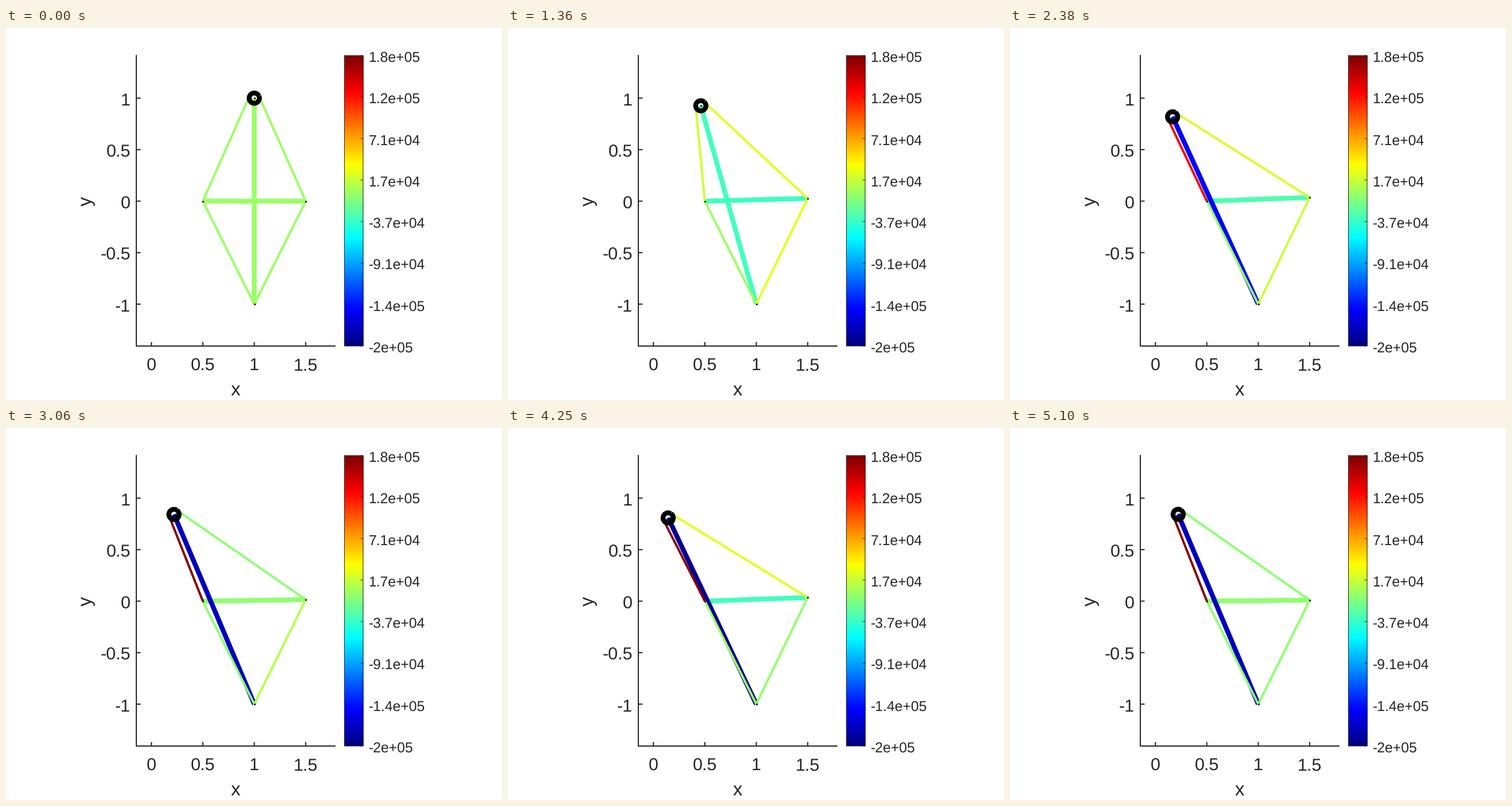
These frames come from a looping animation (864x648 px, 5270 ms). A matplotlib script:

```python
import numpy as np
import matplotlib.pyplot as plt
from matplotlib.animation import FuncAnimation

W, H, DPI = 864, 648, 100
PT = 72 / DPI
INK = "#262626"
plt.rcParams["font.family"] = "Liberation Sans"
plt.rcParams["text.hinting"] = "none"

fig = plt.figure(figsize=(W / DPI, H / DPI), dpi=DPI, facecolor="white")
ax = fig.add_axes([0, 0, 1, 1])


def jet(v):
    v = np.asarray(v)[..., None]
    return np.clip(1.5 - np.abs(4 * v - np.array([3, 2, 1])), 0, 1)


def line(xs, ys, width, color=INK, z=2, cap="butt"):
    return ax.plot(xs, ys, lw=width * PT, color=color, zorder=z, snap=False,
                   solid_capstyle=cap, solid_joinstyle="round")[0]


def label(x, y, text, size, ha="center", **kw):
    ax.text(x, y, text, fontsize=size * PT, color=INK, ha=ha,
            va="baseline", **kw)


def px(x):
    return 253.3 + 179.2 * x


def py(y):
    return 301.6 - 179.4 * y


# Axes
line([227, 227, 574], [47, 554, 554], 2)
for v in np.arange(-1, 1.5, 0.5):
    line([227, 234.5], [py(v)] * 2, 2)
    label(217, py(v) + 12.7, f"{v:g}", 30.5, "right")
for v in np.arange(0, 2, 0.5):
    line([px(v)] * 2, [554, 547], 2)
    label(px(v), 596.5, f"{v:g}", 30.5)
label(400, 640, "x", 33)
label(149, 301.5, "y", 33, rotation=90, rotation_mode="anchor")

# Colour bar
ax.imshow(jet(np.linspace(1, 0, 256))[:, None, :], extent=(589.5, 622, 554, 48),
          aspect="auto", interpolation="nearest", zorder=1)
line([589.5, 622, 622, 589.5, 589.5], [48, 48, 554, 554, 48], 1, cap="projecting")
for k in range(8):
    y = 48 + 506 * k / 7
    line([617.5, 622], [y, y], 1)
    text = f"{1.79e5 - 5.4e4 * k:.1e}".replace(".0e", "e")
    label(631.5, y + 10.8, text, 24.7, "left")

ax.set_xlim(0, W)
ax.set_ylim(H, 0)
ax.axis("off")

# Truss: two struts, four strings, a pulley at the top node
LEFT = np.array([px(0.5), py(0)])
BASE = np.array([px(1), py(-1)])
ARM = 2 * 179.4
PULLEY = 0.05 * 179.4
REST = 0.526
TUG, FALL = 8, 12

# Normalised stress: pulse while tugged, value after the tug,
# settled mean, swing around it, frames to settle
STRESS = {
    "beam": (.0945, .435, .477, -.04, 6),
    "mast": (-.013, .44, .04, -.02, 8),
    "left_top": (.095, .577, .99, -.005, 8),
    "right_top": (-.0895, .597, .557, .045, 6),
    "left_base": (0, .53, .522, .008, 6),
    "right_base": (-.06, .6, .515, 0, 18),
}
members = {name: line([], [], 8.4 if name in ("beam", "mast") else 4, z=3 + k / 10)
           for k, name in enumerate(STRESS)}
ring = line([], [], 8.4, "black", z=5)
dots = ax.plot([], [], "o", ms=3 * PT, mew=0, color="black", zorder=6)[0]


def wave(t):
    return np.cos(np.radians(30 * (t - 12.27)))


def stress(t, pulse, tugged, mean, swing, settle):
    if t < TUG:
        return REST + (tugged - REST) * t / TUG + pulse * np.sin(np.pi * t / TUG)
    k = min((t - TUG) / settle, 1)
    return tugged + k * (mean + swing * wave(t) - tugged)


def top_node(t):
    if t < FALL:
        x = BASE[0] - 151 * (1 - np.cos(np.pi * (t / FALL) ** 1.3)) / 2
    else:
        x = 287 - 0.1 * (t - FALL) - (5.5 + 0.13 * (t - FALL)) * wave(t)
    return np.array([x, BASE[1] - np.sqrt(ARM ** 2 - (x - BASE[0]) ** 2)])


def right_node(t):
    if t < FALL:
        y = LEFT[1] - 7.4 * (1 - np.cos(np.pi * (t / FALL) ** 1.3)) / 2
        y += 5.3 * np.sin(np.pi * min(t / TUG, 1))
    else:
        y = 296.4 + 0.07 * (t - FALL) - 2.2 * wave(t)
    return np.array([px(1.5), y])


def wrap_angle(p, c, side):
    dx, dy = p - c
    return np.arctan2(dy, dx) + side * np.arccos(PULLEY / np.hypot(dx, dy))


def around(c, a):
    return c + PULLEY * np.transpose([np.cos(a), np.sin(a)])


def draw(i):
    top, right = top_node(i), right_node(i)
    a_left = wrap_angle(LEFT, top, 1)
    a_right = wrap_angle(right, top, -1)
    ends = {
        "beam": (LEFT, right),
        "mast": (top, BASE),
        "left_top": (LEFT, around(top, a_left)),
        "right_top": (right, around(top, a_right)),
        "left_base": (LEFT, BASE),
        "right_base": (right, BASE),
    }
    for name, pts in ends.items():
        members[name].set_data(*np.transpose(pts))
        members[name].set_color(jet(stress(i, *STRESS[name])))
    turn = a_right + np.linspace(0, 2 * np.pi, 25)
    ring.set_data(*around(top, turn).T)
    dots.set_data(*np.transpose([LEFT, right, BASE, top]))
    return [*members.values(), ring, dots]


anim = FuncAnimation(fig, draw, frames=31, interval=170, repeat=True,
                     repeat_delay=0, blit=False)
plt.show()
```
